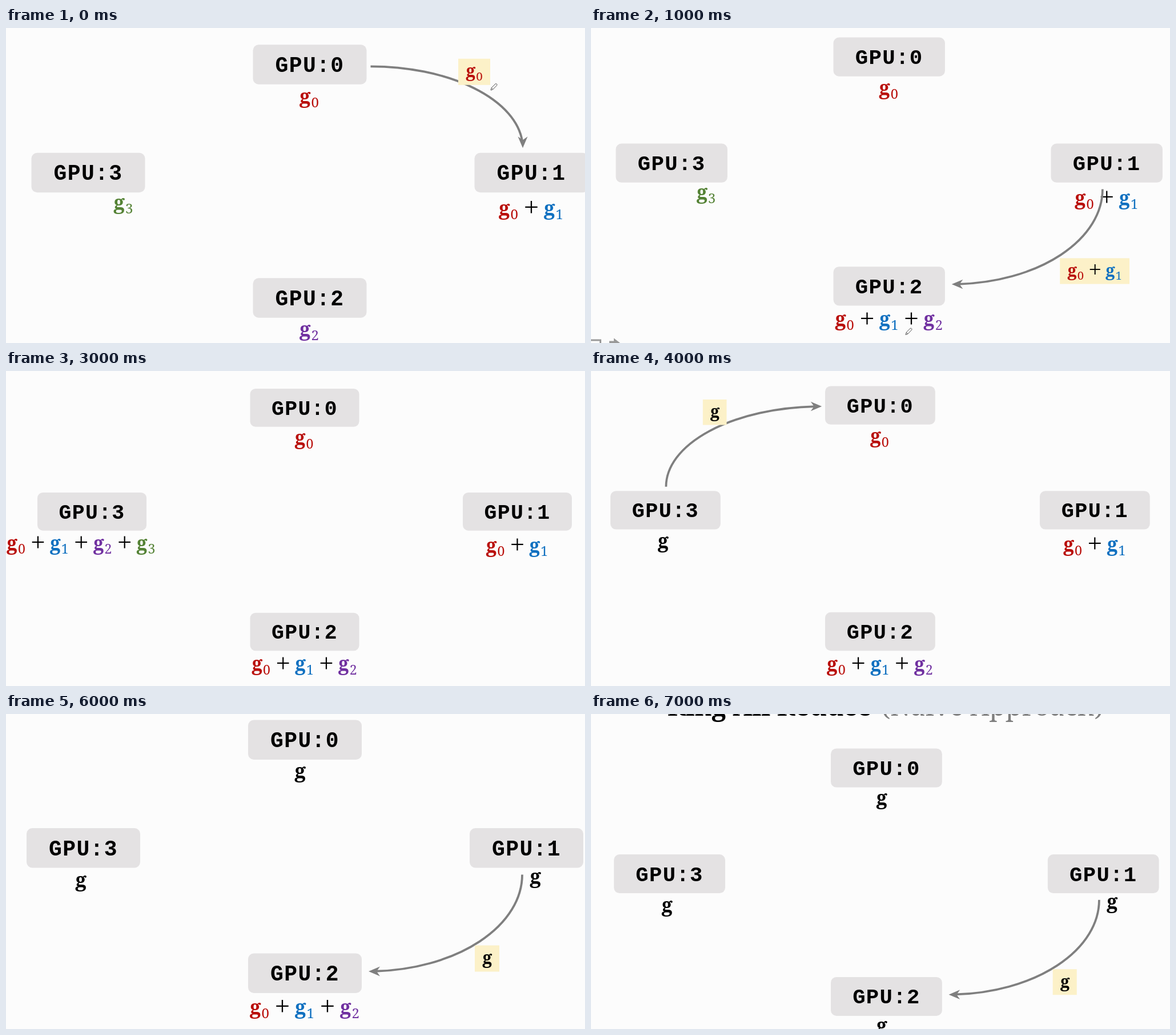
Animation of 1014 by 552 pixels, one loop 8000 ms. Source, as an HTML page:

```html
<!DOCTYPE html>
<html lang="en">
<head>
<meta charset="utf-8">
<title>Ring reduction</title>
<style>
  html, body { margin: 0; width: 100%; height: 100%; overflow: hidden; background: #fcfcfc; }
  svg { display: block; width: 1014px; height: 552px; }
  .scene { visibility: hidden; animation: show 8s step-end infinite; }
  @keyframes show {
    0% { visibility: visible; }
    12.5%, 100% { visibility: hidden; }
  }
  .box { fill: #e4e2e3; }
  .name { font: bold 38px "Liberation Mono", "Courier New", monospace; letter-spacing: 1.4px; text-anchor: middle; }
  .g { font: bold 35px "Noto Serif", serif; }
  .sub { font: 24px "Noto Serif", serif; }
  .plus { font: 46px "Liberation Serif", serif; text-anchor: middle; }
  .tag { fill: #fcf1c8; }
  .line { fill: none; stroke: #7f7f7f; stroke-width: 3.8; stroke-dasharray: 96.5 100; }
  .head { fill: #7f7f7f; }
  .pen { fill: #fcfcfc; stroke: #555; stroke-width: 1; stroke-linejoin: round; }
  .title { font: bold 45px "Noto Serif", serif; }
  .title.soft { font-weight: 400; font-size: 46.5px; }
</style>
</head>
<body>
<svg id="stage" viewBox="0 0 1014 552"></svg>
<script>
const COLORS = ['#b90e0a', '#0f70c0', '#7030a0', '#548235'];
const BOXES = [[0, 0], [388, 189.5], [0, 409], [-388, 189.5]];

// Where each value sits below its box: x and baseline
const SPOTS = [
  { '0': [81.5, 102.5], g: [81.5, 101] },
  { '01': [42.5, 109], g: [105.5, 97] },
  { '2': [81.5, 101.5], '012': [3, 106], g: [81.5, 99.5] },
  { '3': [144, 99.5], '0123': [-56, 105], g: [85.5, 103] }
];

// Curved connectors: path up to the arrow tip, tip angle
const ROUTES = {
  '01': ['M206 38A266.5 143 0 0 1', 472.5, 181, 90],
  '12': ['M480 271A269 169.4 0 0 1', 211, 440.4, 180],
  '23': ['M-9 444A271.5 178.3 0 0 1', -280.5, 265.7, -90],
  '30': ['M-287.5 182A281.5 145.4 0 0 1', -6, 36.6, 0]
};

// One scene per second; cam is x, y, scale
const SCENES = [
  { cam: [432.5, 29.3, 1], sums: ['0', '01', '2', '3'], route: '01', tag: ['0', 359.5, 24.5], pen: [849, 109] },
  { cam: [424.5, 16.5, .982], sums: ['0', '01', '012', '3'], route: '12', tag: ['01', 404, 394], pen: [551, 537.5], nav: true },
  { cam: [419, 32.5, .973], sums: ['0', '01', '012', '3'], route: '23', tag: ['012', -394.5, 389.7], pen: [225, 522] },
  { cam: [427.5, 31, .96], sums: ['0', '01', '012', '0123'] },
  { cam: [410, 26.5, .969], sums: ['0', '01', '012', 'g'], route: '30', tag: ['g', -221, 24.2] },
  { cam: [424, 21, .979], sums: ['g', 'g', '012', 'g'], route: '01', tag: ['g', 359.5, 24.5] },
  { cam: [424, 10.5, 1], sums: ['g', 'g', '012', 'g'], route: '12', tag: ['g', 397, 395] },
  { cam: [420, 60.5, .979], sums: ['g', 'g', 'g', 'g'], route: '12', tag: ['g', 397, 395], title: true }
];

const text = (cls, x, y, str, fill = '#000') =>
  `<text class="${cls}" x="${x}" y="${y}" fill="${fill}">${str}</text>`;

const group = (x, y, scale, body) =>
  `<g transform="translate(${x} ${y}) scale(${scale})">${body}</g>`;

function sum(terms) {
  if (terms === 'g') return text('g', 0, 0, 'g');
  return [...terms].map((n, i) => {
    const x = i * 79;
    return (i ? text('plus', x - 22, 1.5, '+') : '') +
      text('g', x, 0, 'g', COLORS[n]) +
      text('sub', x + 20.5, 7, n, COLORS[n]);
  }).join('');
}

function node(i, terms) {
  const [x, y] = SPOTS[i][terms];
  return group(...BOXES[i], 1,
    '<rect class="box" width="199" height="69.5" rx="10"/>' +
    text('name', 99.5, 47.5, 'GPU:' + i) +
    group(x, y, 1, sum(terms)));
}

// The dash pattern stops the line inside the arrow head
function arrow(id) {
  const [d, x, y, angle] = ROUTES[id];
  return `<path class="line" pathLength="100" d="${d} ${x} ${y}"/>` +
    `<path class="head" transform="translate(${x} ${y}) rotate(${angle})" d="M0 0L-20 -8.5L-14 0L-20 8.5Z"/>`;
}

function tag([terms, x, y]) {
  const width = terms === 'g' ? 43 : 56 + 68 * (terms.length - 1);
  return group(x, y, 1,
    `<rect class="tag" width="${width}" height="46"/>` +
    group(13.5, 32.3, .86, sum(terms)));
}

const pen = ([x, y]) => group(x, y, 1,
  '<path class="pen" d="M0 0L1.3 -4.3L8 -11L9.5 -11.6L11 -10L10.5 -8.3L3.8 -1.4ZM1.3 -4.3L3.8 -1.4"/>');

const nav =
  '<path d="M-2 547H16.5V556" fill="none" stroke="#999" stroke-width="3"/>' +
  '<path d="M32 548.5H40V543.5L51 552H32Z" fill="#999"/>';

const title =
  text('title', 134, 3, 'Ring All Reduce') +
  text('title soft', 508, 3, '(Naive Approach)', '#7f7f7f');

document.getElementById('stage').innerHTML = SCENES.map((s, i) =>
  `<g class="scene" style="animation-delay:${i - SCENES.length}s">` +
  group(...s.cam,
    s.sums.map((terms, n) => node(n, terms)).join('') +
    (s.route ? arrow(s.route) : '') +
    (s.tag ? tag(s.tag) : '')) +
  (s.pen ? pen(s.pen) : '') +
  (s.nav ? nav : '') +
  (s.title ? title : '') +
  '</g>').join('');
</script>
</body>
</html>
```
